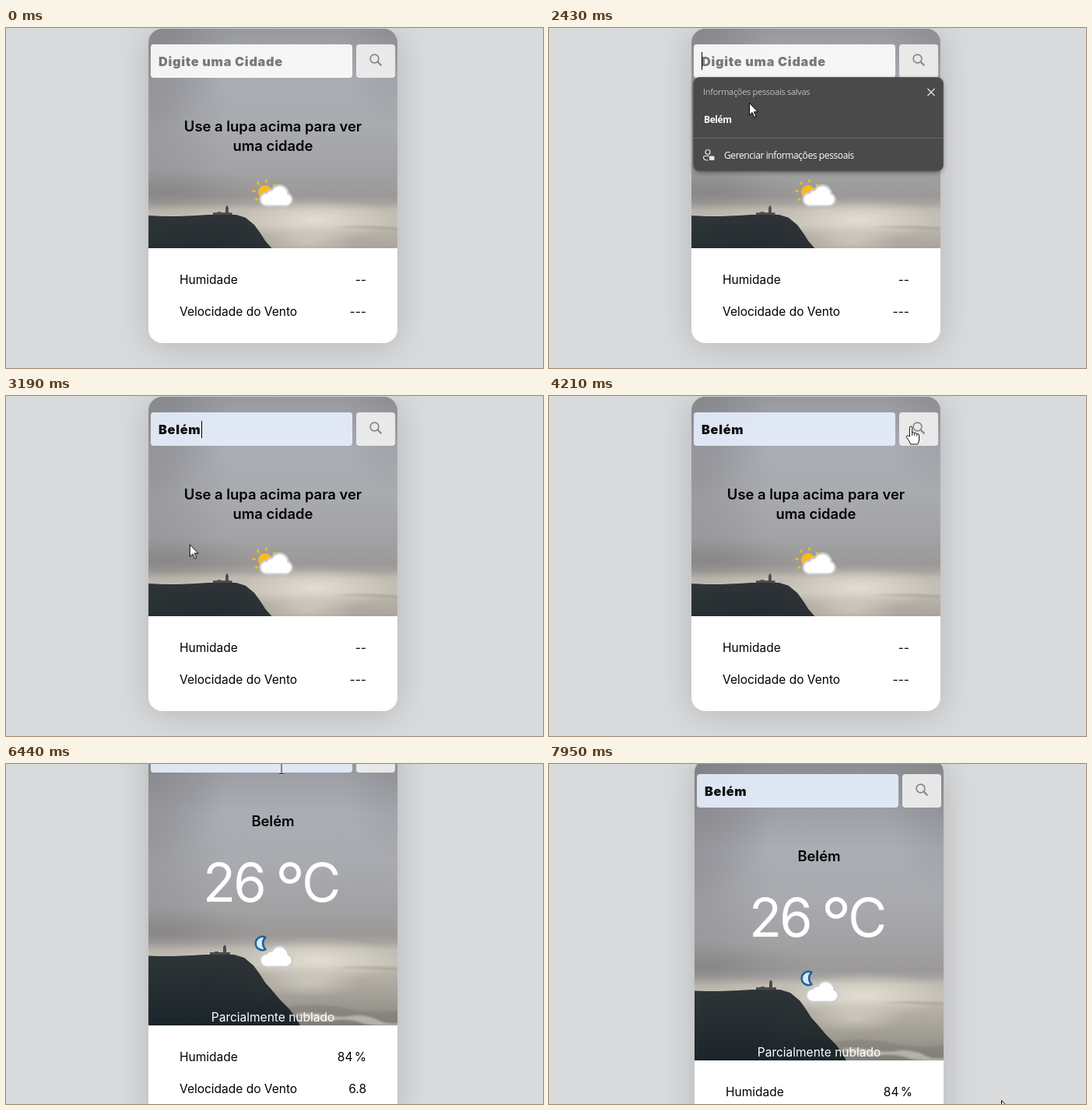
An HTML page for the animation above (8 s loop, 690 by 437 pixels).

```html
<!DOCTYPE html>
<html lang="pt-BR">
<head>
<meta charset="utf-8">
<title>Clima</title>
<style>
html, body { margin: 0; width: 100%; height: 100%; overflow: hidden; background: #d9dadc; }
svg { display: block; width: 100vw; height: 100vh; }
text { font: 400 15.5px Inter, sans-serif; }
.title { font-weight: 600; font-size: 18.4px; text-anchor: middle; }
.value { text-anchor: end; word-spacing: -2px; }
.temp { font-size: 69px; letter-spacing: -3px; fill: #fff; }
.field { font-weight: 900; font-size: 16.3px; letter-spacing: .7px; }
.menu text { font: 400 12px "Open Sans", sans-serif; letter-spacing: -.4px; fill: #fff; }
.menu .head { font-size: 11px; letter-spacing: -.3px; fill: #bdbdbd; }
.menu .name { font-weight: 700; }

/* time in percent = ms / 80 */
.on { animation: 8s step-end infinite; }
#home { animation-name: home; }
#result { animation-name: result; }
#bar { animation-name: bar; }
#hint { animation-name: hint; }
#filled, #hover { animation-name: filled; }
#caretA { animation-name: caretA; }
#caretB { animation-name: caretB; }
#arrow { animation-name: arrow; }
#beam { animation-name: beam; }
#hand { animation-name: hand; }
#menu { transform-origin: 346px 124px; animation: menu 8s linear infinite; }
#mouse { animation: mouse 8s ease-in-out infinite; }

@keyframes home { 0% { opacity: 1 } 53.375%, 100% { opacity: 0 } }
@keyframes result {
  0% { opacity: 0; transform: none }
  53.375% { opacity: 1; transform: none }
  99.375%, 100% { opacity: 1; transform: translate(4px, 45px) }
}
@keyframes bar {
  0% { transform: none }
  53.375% { transform: translate(0, -53px) }
  99.375%, 100% { transform: translate(4px, -8px) }
}
@keyframes hint { 0% { opacity: 1 } 31%, 100% { opacity: 0 } }
@keyframes filled { 0% { opacity: 0 } 31%, 100% { opacity: 1 } }
@keyframes caretA {
  0% { opacity: 0 } 11% { opacity: 1 } 18.625% { opacity: 0 }
  24.375% { opacity: 1 } 31%, 100% { opacity: 0 }
}
@keyframes caretB {
  0% { opacity: 0 } 34.625% { opacity: 1 } 41% { opacity: 0 }
  47% { opacity: 1 } 52.625%, 100% { opacity: 0 }
}
@keyframes menu {
  0%, 10.75% { opacity: 0; transform: scale(.95) }
  12.8%, 35.5% { opacity: 1; transform: none }
  37.7%, 100% { opacity: 0; transform: scale(.95) }
}
@keyframes arrow {
  0% { opacity: 1 } 9% { opacity: 0 } 26.9% { opacity: 1 } 44% { opacity: 0 }
  57.75% { opacity: 1 } 63.5% { opacity: 0 } 73.5% { opacity: 1 } 76% { opacity: 0 }
  81.5%, 100% { opacity: 1 }
}
@keyframes beam {
  0% { opacity: 0 } 9% { opacity: 1 } 26.9% { opacity: 0 } 44% { opacity: 1 } 48% { opacity: 0 }
  63.5% { opacity: 1 } 73.5% { opacity: 0 } 76% { opacity: 1 } 81.5%, 100% { opacity: 0 }
}
@keyframes hand { 0% { opacity: 0 } 48% { opacity: 1 } 57.75%, 100% { opacity: 0 } }
@keyframes mouse {
  0%, 2.9% { transform: translate(635px, 445px) }
  10.2%, 24% { transform: translate(334px, 47px) }
  30.375% { transform: translate(257px, 96px) }
  32.5%, 37% { transform: translate(247px, 107px) }
  40.5% { transform: translate(235px, 196px) }
  44.25% { transform: translate(202px, 65px) }
  48.5%, 57.2% { transform: translate(465px, 39px) }
  65.5%, 72.2% { transform: translate(415px, 172px) }
  76.4%, 78.2% { transform: translate(314px, 5px) }
  80.5% { transform: translate(354px, 5px) }
  84% { transform: translate(556px, 45px) }
  88.375%, 88.6% { transform: translate(480px, 100px) }
  92.75%, 100% { transform: translate(581px, 432px) }
}
</style>
</head>
<body>
<svg viewBox="0 0 690 437" xmlns="http://www.w3.org/2000/svg">
<defs>
  <linearGradient id="sky" x2="0" y2="1">
    <stop offset="0" stop-color="#8a8b8f"/>
    <stop offset=".14" stop-color="#9a9ca2"/>
    <stop offset=".3" stop-color="#aaadb4"/>
    <stop offset=".46" stop-color="#a9abb0"/>
    <stop offset=".62" stop-color="#a1a1a3"/>
    <stop offset=".7" stop-color="#9b9998"/>
    <stop offset=".725" stop-color="#a6a39f"/>
    <stop offset=".75" stop-color="#c1bcb2"/>
    <stop offset=".8" stop-color="#c5c0b5"/>
    <stop offset=".83" stop-color="#b6b1a7"/>
    <stop offset=".93" stop-color="#9d9991"/>
    <stop offset="1" stop-color="#85827c"/>
  </linearGradient>
  <linearGradient id="rock" x2="1" y2=".6">
    <stop offset="0" stop-color="#2e3638"/>
    <stop offset=".5" stop-color="#33373a"/>
    <stop offset="1" stop-color="#4c4945"/>
  </linearGradient>
  <linearGradient id="shade" x2=".3" y2="1">
    <stop offset="0" stop-color="#142026" stop-opacity="0"/>
    <stop offset="1" stop-color="#142026" stop-opacity=".85"/>
  </linearGradient>
  <radialGradient id="glow">
    <stop offset="0" stop-color="#f3eee0"/>
    <stop offset="1" stop-color="#f3eee0" stop-opacity="0"/>
  </radialGradient>
  <radialGradient id="dark">
    <stop offset="0" stop-color="#716f72"/>
    <stop offset="1" stop-color="#716f72" stop-opacity="0"/>
  </radialGradient>
  <filter id="soft" x="-50%" y="-50%" width="200%" height="200%"><feGaussianBlur stdDeviation="22"/></filter>
  <filter id="drop" x="-10%" y="-20%" width="120%" height="140%"><feGaussianBlur stdDeviation="3"/></filter>
  <filter id="haze" x="-20%" y="-60%" width="140%" height="220%"><feGaussianBlur stdDeviation="1.3"/></filter>
  <clipPath id="homeClip"><rect x="183" y="1" width="320" height="404" rx="18"/></clipPath>
  <clipPath id="resultClip"><rect x="183" y="-52" width="320" height="510" rx="18"/></clipPath>

  <path id="cliff" d="M175 246l20 1 20 0 25-1 16-1 37 0 13 4 12 10 8 11 7 11 8 9 11 13 12 12 10 13 4 9H175z"/>
  <g id="photo">
    <rect x="175" y="-53" width="336" height="389" fill="url(#sky)"/>
    <ellipse cx="183" cy="-20" rx="110" ry="150" fill="url(#dark)" opacity=".4"/>
    <ellipse cx="183" cy="100" rx="100" ry="170" fill="url(#dark)" opacity=".3"/>
    <ellipse cx="510" cy="-10" rx="80" ry="140" fill="url(#dark)" opacity=".3"/>
    <ellipse cx="200" cy="214" rx="130" ry="32" fill="url(#dark)" opacity=".4"/>
    <ellipse cx="400" cy="252" rx="105" ry="30" fill="url(#glow)" opacity=".65"/>
    <ellipse cx="390" cy="282" rx="65" ry="18" fill="url(#glow)" opacity=".4"/>
    <g filter="url(#haze)">
      <path d="M420 262q45-4 91 0v4q-40-3-91-4z" fill="#938f87" opacity=".4"/>
      <path d="M362 312q40-6 75 2t74 2v20H376z" fill="#77756f" opacity=".4"/>
      <path d="M372 321q22-2 40 2t38 0q20 1 30 7t31 2v4q-40 2-56-4t-40-2q-28 0-43-9z" fill="#dddad3" opacity=".55"/>
    </g>
    <path d="M262 246v-4h6v-1h5v1h6v-6l1-3h2l1 3v6h5v4z" fill="#4a4d4e"/>
    <use href="#cliff" fill="url(#rock)"/>
    <use href="#cliff" fill="url(#shade)"/>
  </g>

  <g id="puffs">
    <circle cx="335" cy="220.3" r="7.3"/>
    <circle cx="341" cy="215" r="5.5"/>
    <circle cx="351.5" cy="213.5" r="10"/>
    <circle cx="359.5" cy="220.5" r="7"/>
    <rect x="335" y="214" width="25" height="13.6"/>
  </g>
  <g id="cloud">
    <use href="#puffs" fill="#cbcccd" stroke="#cbcccd" stroke-width="5"/>
    <use href="#puffs" fill="#fff"/>
  </g>
</defs>

<rect width="690" height="437" fill="#d9dadc"/>

<g id="home" class="on">
  <rect x="183" y="5" width="320" height="404" rx="18" opacity=".17" filter="url(#soft)"/>
  <g clip-path="url(#homeClip)">
    <use href="#photo" transform="translate(343 141.5) scale(.952) translate(-343 -141.5)"/>
    <rect x="183" y="283" width="320" height="122" fill="#fff"/>
  </g>
  <text class="title" x="343" y="133">Use a lupa acima para ver</text>
  <text class="title" x="343" y="158">uma cidade</text>
  <circle cx="333" cy="211" r="9" fill="#f5bc1c"/>
  <circle cx="333" cy="211" r="14.5" fill="none" stroke="#f5bc1c" stroke-width="4" stroke-dasharray="2.4 8.99"/>
  <use href="#cloud"/>
  <text x="223" y="329">Humidade</text>
  <text class="value" x="463" y="329">--</text>
  <text x="223" y="370">Velocidade do Vento</text>
  <text class="value" x="463" y="370">---</text>
</g>

<g id="result" class="on">
  <rect x="183" y="-48" width="320" height="510" rx="18" opacity=".17" filter="url(#soft)"/>
  <g clip-path="url(#resultClip)">
    <use href="#photo"/>
    <rect x="183" y="336" width="320" height="122" fill="#fff"/>
  </g>
  <text class="title" x="343" y="80">Belém</text>
  <text class="temp" x="253" y="176.5">26</text>
  <circle cx="365" cy="140" r="11.2" fill="none" stroke="#fff" stroke-width="5.6"/>
  <text class="temp" x="380" y="176.5">C</text>
  <path d="M333.5 222.8a8.7 8.7 0 1 0 0 15.4a10.5 10.5 0 0 1 0-15.4z" fill="#dfe8f0" stroke="#1f62a3" stroke-width="2.6" stroke-linejoin="round"/>
  <use href="#cloud" y="32"/>
  <text x="343" y="331" text-anchor="middle" fill="#fff">Parcialmente nublado</text>
  <text x="223" y="382">Humidade</text>
  <text class="value" x="463" y="382">84 %</text>
  <text x="223" y="423">Velocidade do Vento</text>
  <text class="value" x="463" y="423">6.8</text>
</g>

<g id="bar" class="on">
  <g opacity=".9">
    <g id="hint" class="on">
      <rect x="186" y="21" width="259" height="43" rx="4" fill="#fff"/>
      <text class="field" x="196" y="49" fill="#757575">Digite uma Cidade</text>
    </g>
    <g id="filled" class="on">
      <rect x="186" y="21" width="259" height="43" rx="4" fill="#e8f0fe"/>
      <text class="field" x="196" y="49">Belém</text>
    </g>
    <rect x="450" y="21" width="50" height="43" rx="4" fill="#f2f2f2"/>
    <g fill="none" stroke="#858585" stroke-linecap="round">
      <circle cx="473.5" cy="39.5" r="5.4" stroke-width="1.6"/>
      <path d="M477.8 43.8l4 4" stroke-width="2.2"/>
    </g>
  </g>
  <rect id="caretA" class="on" x="196" y="31" width="1" height="23"/>
  <rect id="caretB" class="on" x="251" y="32" width="1" height="22"/>
</g>

<g id="menu" class="menu">
  <rect x="186" y="66" width="320" height="120" rx="8" opacity=".4" filter="url(#drop)"/>
  <rect x="185.5" y="63.5" width="321" height="120.5" rx="8" fill="#4a4a4a" stroke="#5c5c5c"/>
  <rect id="hover" class="on" x="190" y="99" width="312" height="38" rx="3" fill="#fff" fill-opacity=".16"/>
  <path d="M186 141.5h320" stroke="#666"/>
  <text class="head" x="198" y="86">Informações pessoais salvas</text>
  <text class="name" x="199" y="122">Belém</text>
  <text x="225" y="168">Gerenciar informações pessoais</text>
  <g fill="none" stroke="#e8e8e8" stroke-width="1.2">
    <path d="M486.5 78l9 9m0-9l-9 9"/>
    <circle cx="204" cy="159.5" r="3"/>
    <path d="M206 164.5h-5.5q-2 0-2 2 0 3.5 6 3.5"/>
    <rect x="206.5" y="165" width="5.5" height="4.5" rx="1" fill="#e8e8e8"/>
  </g>
</g>

<g id="mouse">
  <path id="arrow" class="on" d="M.5.5v15.5l3.6-3.4 2.6 6 2.3-1-2.6-5.8h4.9z" fill="#fff" stroke="#000"/>
  <g id="beam" class="on" fill="none">
    <path d="M-3-7.5h6M0-7.5v15M-3 7.5h6" stroke="#fff" stroke-width="2.4" opacity=".5"/>
    <path d="M-3-7.5h2.5l.5.5.5-.5H3M0-7v14M-3 7.5h2.5l.5-.5.5.5H3" stroke="#111"/>
  </g>
  <path id="hand" class="on" d="M-1.6 13V1.6a1.6 1.6 0 0 1 3.2 0V8q3-1 3.2.8 2.6-.8 3 .9 2.8-.6 2.8 2V17q0 3-2 6H-.4q-1-3.5-5.6-9.5 .8-2.8 4.4-.5zM1.6 8v4M4.8 9v3M7.8 10v2.5" fill="#fff" stroke="#111" stroke-linejoin="round"/>
</g>
</svg>
</body>
</html>
```
